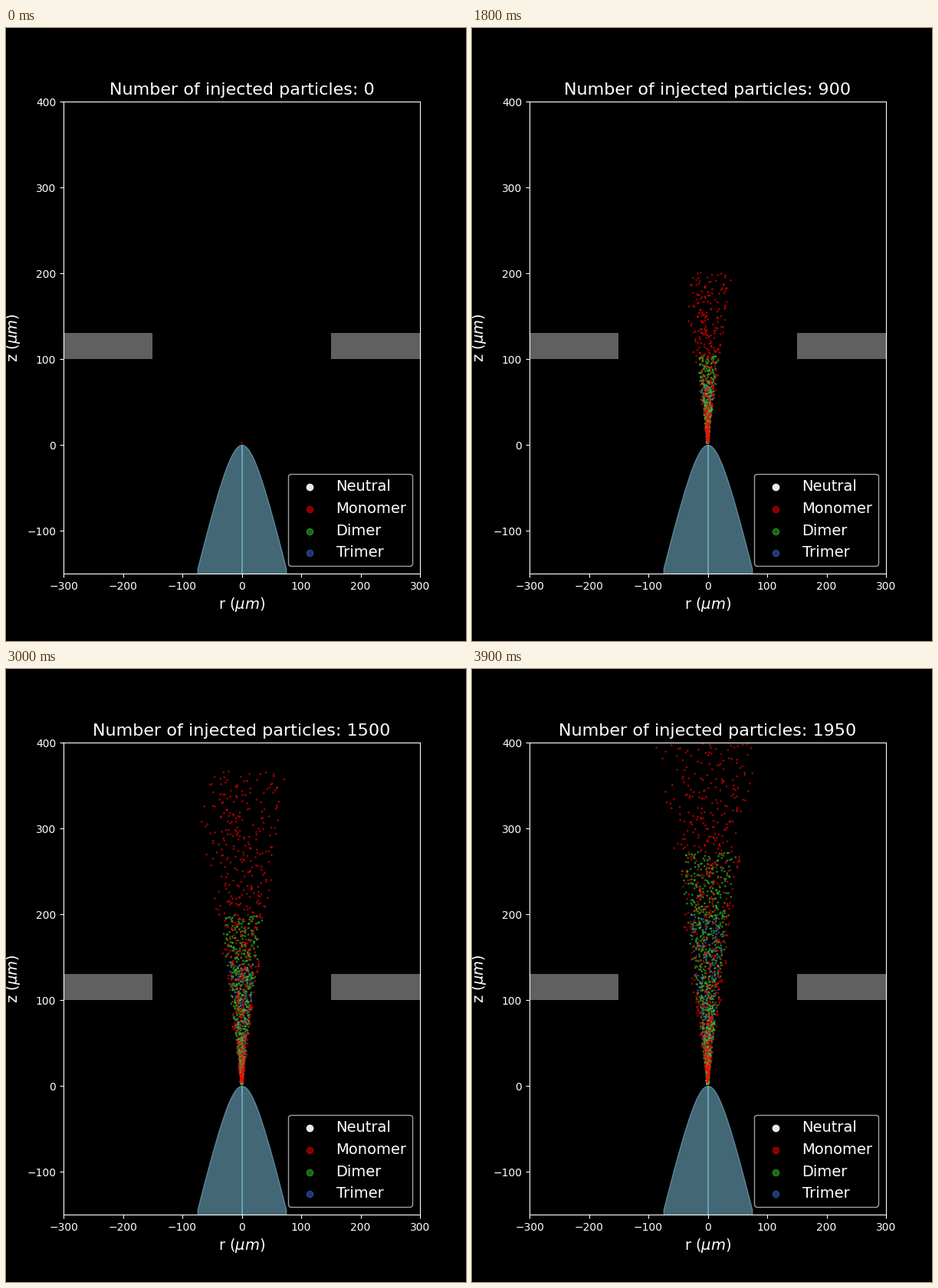
Animation of 600 by 800 pixels, one loop 4 s. Source, as a matplotlib script:

```python
import numpy as np
import matplotlib.pyplot as plt
from matplotlib.animation import FuncAnimation
from matplotlib.colors import to_rgba

FRAMES = 40
INTERVAL = 100
PER_FRAME = 50
TOTAL = (FRAMES - 1) * PER_FRAME + 1

SPECIES = ["Neutral", "Monomer", "Dimer", "Trimer"]
COLORS = np.array([
    to_rgba("whitesmoke", 0.95),
    to_rgba("red", 0.5),
    to_rgba("limegreen", 0.5),
    to_rgba("royalblue", 0.5),
])
SHARES = [0.015, 0.42, 0.40, 0.165]

# Per species: final speed (um per frame), acceleration time, lag, cone slope
SPEED = np.array([0.1, 13.9, 8.3, 6.4])
TAU = np.array([1.0, 5.0, 8.5, 11.5])
LAG = np.array([0.0, 53.0, 53.7, 53.7])
SLOPE = np.array([0.3, 0.22, 0.18, 0.16])
Z_START = 2.0

rng = np.random.default_rng(7)
kind = rng.choice(4, TOTAL, p=SHARES)
kind[0] = 1
birth = np.arange(TOTAL) / PER_FRAME
# Uniform disc seen from the side
spread = np.sqrt(rng.random(TOTAL)) * np.cos(rng.uniform(0, 2 * np.pi, TOTAL))


def positions(frame):
    """Places of all particles injected up to this frame."""
    n = frame * PER_FRAME + 1
    k = kind[:n]
    age = frame - birth[:n]
    z = Z_START + SPEED[k] * age - LAG[k] * (1 - np.exp(-age / TAU[k]))
    r = spread[:n] * (0.5 + SLOPE[k] * z)
    return np.column_stack([r, z])


def draw_emitter(ax):
    # Hyperbolic tip, one half per side; the halves overlap along the axis
    gap, tip_radius = 100.0, 11.2
    r = np.linspace(0, 74.5, 120)
    z = gap - np.sqrt(gap ** 2 + gap / tip_radius * r ** 2)
    for side in (-1, 1):
        ax.fill_between(side * r, z, -200, color="skyblue", alpha=0.5)


def draw_electrodes(ax):
    for left in (-300, 150):
        ax.add_patch(plt.Rectangle((left, 100), 150, 30, color="#606060", lw=0))


plt.style.use("dark_background")
plt.rcParams["font.family"] = "DejaVu Sans"
fig, ax = plt.subplots(figsize=(6, 8), dpi=100)
ax.set_xlim(-300, 300)
ax.set_ylim(-150, 400)
ax.set_xlabel(r"r ($\mu m$)", fontsize=14)
ax.set_ylabel(r"z ($\mu m$)", fontsize=14, labelpad=4.5)
title = ax.set_title("", fontsize=16, pad=6.5)

draw_electrodes(ax)
draw_emitter(ax)

handles = [ax.scatter([], [], s=36, color=[c]) for c in COLORS]
ax.legend(handles, SPECIES, loc="lower right", fontsize=14, scatterpoints=1,
          scatteryoffsets=[0.375])

dots = ax.scatter(np.zeros(TOTAL), np.zeros(TOTAL), s=1,
                  color=COLORS[kind], zorder=2)


def update(frame):
    dots.set_offsets(positions(frame))
    title.set_text(f"Number of injected particles: {frame * PER_FRAME}")
    return dots, title


anim = FuncAnimation(fig, update, frames=FRAMES, interval=INTERVAL,
                     init_func=lambda: update(0), repeat=True, repeat_delay=0)
plt.show()
```
